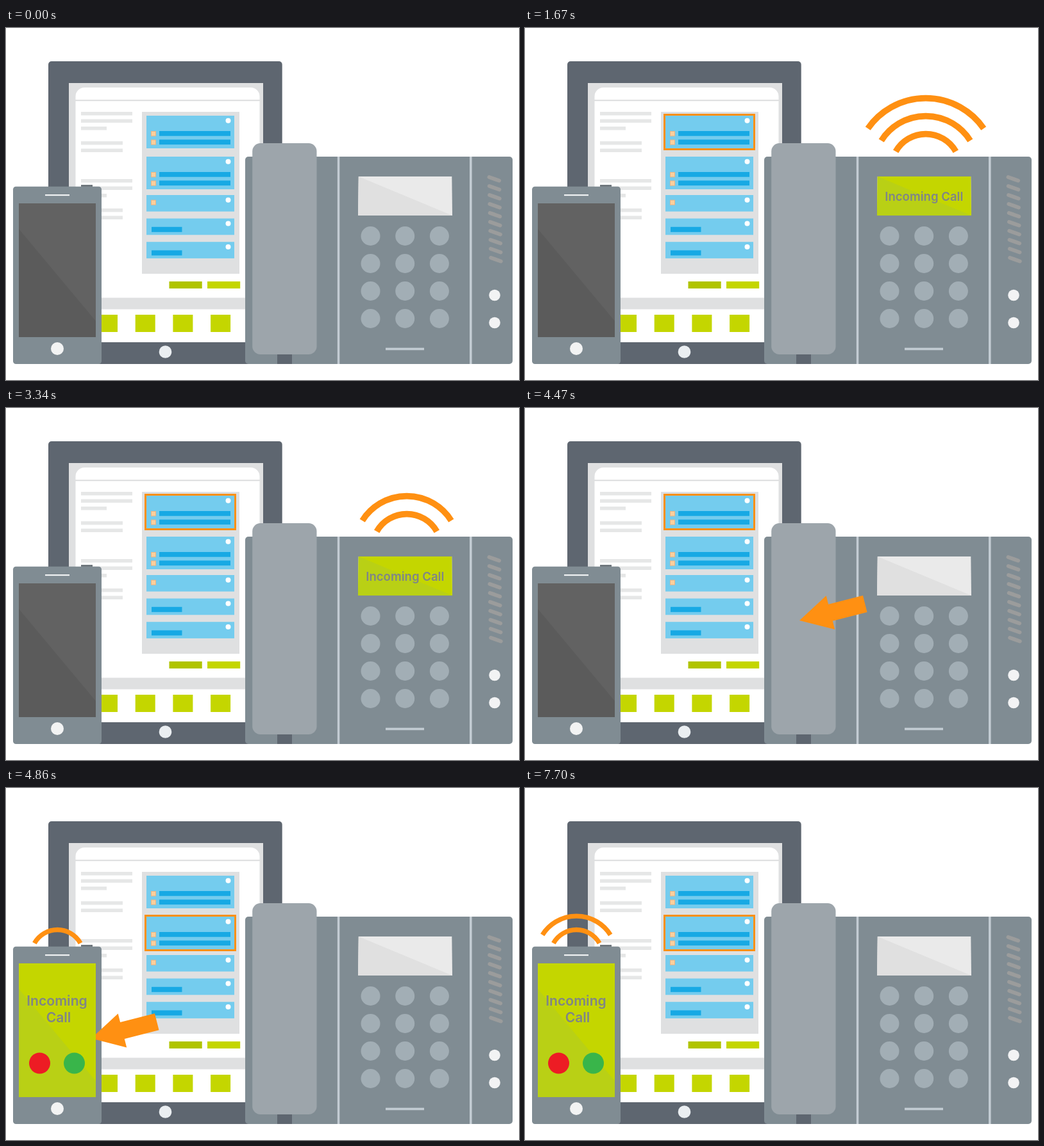
Write an HTML page that moves like this. It is 800 px wide and 550 px high and loops after 8 s.

```html
<!DOCTYPE html>
<html lang="en">
<head>
<meta charset="utf-8">
<title>Incoming call hand-over</title>
<style>
  html, body { margin: 0; width: 100%; height: 100%; overflow: hidden; background: #fff; }
  svg { display: block; width: 100%; height: 100%; }
  text { font: 600 18.6px Inter, sans-serif; fill: #7f8588; text-anchor: middle; }
  .large { font-size: 21.1px; }
  .arcs, .marker { fill: none; stroke: #ff9012; }
</style>
</head>
<body>
<svg id="stage" viewBox="0 0 800 550"></svg>
<script>
const SLATE = '#5e6670', STEEL = '#808c93', MIST = '#c3ccd3', PANEL = '#dfe0e1';
const LIME = '#c4d600', LIME_SHADE = '#b9d015', SKY = '#74ccee', BLUE = '#17a9e4';
const ORANGE = '#ff9012';

const rect = (x, y, w, h, fill, r = 0) =>
  `<rect x="${x}" y="${y}" width="${w}" height="${h}" rx="${r}" fill="${fill}"/>`;
const dot = (x, y, r, fill) => `<circle cx="${x}" cy="${y}" r="${r}" fill="${fill}"/>`;
const poly = (points, fill) => `<polygon points="${points}" fill="${fill}"/>`;
const repeat = (n, draw) => Array.from({ length: n }, (_, i) => draw(i)).join('');

// Three concentric signal arcs, each a little flatter than the one inside it.
const arcs = (id, x, y, scale) =>
  `<g id="${id}" class="arcs" stroke-width="9.6" transform="translate(${x} ${y}) scale(${scale})">` +
  repeat(3, i => {
    const r = 53.8 + 28 * i, a = (60.5 - 2.6 * i) * Math.PI / 180;
    const dx = r * Math.sin(a), dy = -r * Math.cos(a);
    return `<path d="M${-dx} ${dy}A${r} ${r} 0 0 1 ${dx} ${dy}"/>`;
  }) + '</g>';

const deskDisplay = (light, shade) =>
  poly('549.8,232 695.3,232 696,293 549,293', light) + poly('549.8,232 696,293 549,293', shade);
const phoneScreen = (light, shade) =>
  rect(20, 274, 120, 209, light) + poly('20,314 140,458 140,483 20,483', shade);

const paragraphs = top =>
  repeat(2, i => rect(117, top + 11.5 * i, 80, 5.5, '#e6e7e7')) +
  rect(117, top + 23, 40, 5.5, '#e6e7e7') +
  repeat(2, i => rect(117, top + 46 + 11.5 * i, 65, 5.5, '#e6e7e7'));

const card = (y, h) => rect(219, y, 137, h, SKY) + dot(346.5, y + 7.8, 4, '#fff');
const checkbox = y =>
  `<rect x="226.5" y="${y + .5}" width="7" height="7.3" fill="#fbcf9c" stroke="#e5b587"/>`;
const task = y => checkbox(y) + rect(239, y, 111, 7.7, BLUE);

function tallCard(i) {
  const y = 137 + 64 * i;
  return card(y, 51) + task(y + 24) + task(y + 37.4);
}

function shortCard(i) {
  const y = 261 + 36.6 * i;
  return card(y, 25.7) + (i ? rect(227, y + 13.2, 47.5, 8, BLUE) : checkbox(y + 7.5));
}

function tablet() {
  return rect(66, 52, 364.7, 473, SLATE, 5) +
    rect(98, 86, 303, 405, PANEL) +
    `<path d="M108.5 421.5V107a14 14 0 0 1 14-14H381.5a14 14 0 0 1 14 14V421.5z" fill="#fff"/>` +
    rect(108, 112, 288, 2.2, PANEL) +
    rect(98, 439.5, 303, 51.5, '#fff') +
    paragraphs(131) + paragraphs(236) +
    rect(212, 131, 152, 253, PANEL) +
    repeat(2, tallCard) + repeat(3, shortCard) +
    rect(254.5, 396, 51.2, 11, '#b0c400') + rect(314, 396, 51.2, 11, LIME) +
    repeat(4, i => rect(143 + 58.7 * i, 448, 31, 27, LIME)) +
    dot(248.5, 506, 9.8, '#eaeef1');
}

function deskPhone() {
  return rect(373, 201, 417, 324, STEEL, 5) +
    rect(423, 505, 23, 20, SLATE) +
    rect(384.2, 180, 100.3, 330, '#9da5ab', 12.5) +
    rect(516.8, 201, 3.5, 324, MIST) + rect(723, 201, 3.6, 324, MIST) +
    deskDisplay('#eaeaea', '#e0e0e0') +
    repeat(12, i => dot(568.5 + 53.7 * (i % 3), 325 + 43 * Math.floor(i / 3), 15, '#a2aeb5')) +
    rect(592, 499.7, 60, 3.6, MIST) +
    repeat(10, i => `<path d="M${753.5 + i * .3} ${233 + i * 14}l15.5 5.5"
      stroke="#9b9c9c" stroke-width="6" stroke-linecap="round"/>`) +
    repeat(2, i => dot(762, 417.5 + 43 * i, 8.8, '#f2f3f4'));
}

function mobile() {
  return rect(117, 245, 18, 6, '#6e767c') +
    rect(11, 247.7, 138, 277.3, STEEL, 4.5) +
    rect(61, 260, 38, 2.2, '#f0f2f3') +
    phoneScreen('#626262', '#5b5b5b') +
    dot(80, 501, 10, '#f2f3f3');
}

const stage = document.getElementById('stage');
stage.innerHTML = tablet() +
  '<rect id="marker" class="marker" x="217.5" y="135.5" width="140" height="54" stroke-width="3"/>' +
  deskPhone() +
  `<g id="deskCall">${deskDisplay(LIME, LIME_SHADE)}<text x="622.3" y="270">Incoming Call</text></g>` +
  arcs('deskArcs', 625, 219.4, 1) +
  arcs('phoneArcs', 80.2, 262.7, .765) +
  mobile() +
  `<g id="arrow"><path transform="rotate(-14.3)" fill="${ORANGE}"
    d="M0 0L50-27.3V-13.4H105.5V13.4H50V27.3z"/></g>` +
  `<g id="phoneCall">${phoneScreen(LIME, LIME_SHADE)}
    <text class="large" x="79.5" y="340">Incoming</text><text class="large" x="82" y="366">Call</text>
    ${dot(52.5, 430, 16.5, '#ed1c24')}${dot(106.5, 430, 16.5, '#39b54a')}</g>`;

const part = id => document.getElementById(id);
const show = (el, on) => el.setAttribute('visibility', on ? 'visible' : 'hidden');
const move = (el, x, y) => el.setAttribute('transform', `translate(${x} ${y})`);

const LOOP = 8000, CALL = 530, HANG_UP = 4440, DEPART = 4470, ARRIVE = 4860;
const STEP = 30, BEAT = 570;

// Arcs appear one per beat, then all vanish for the last beat of the cycle.
function pulse(id, ringing, elapsed, cycle) {
  const count = ringing ? (Math.floor(elapsed % cycle / BEAT) + 1) % 4 : 0;
  [...part(id).children].forEach((arc, i) => show(arc, i < count));
}

function render(t) {
  const deskRings = t >= CALL && t < HANG_UP, phoneRings = t >= ARRIVE;
  const stepped = Math.floor((t - DEPART) / STEP) * STEP;
  const p = Math.min(Math.max(stepped / (ARRIVE - DEPART), 0), 1);

  show(part('marker'), t >= CALL);
  move(part('marker'), 0, 64 * p);
  show(part('arrow'), t >= DEPART && t < ARRIVE + STEP);
  move(part('arrow'), 428 - 295 * p, 332 + 59.3 * p);
  show(part('deskCall'), deskRings);
  show(part('phoneCall'), phoneRings);
  pulse('deskArcs', deskRings, t - CALL, 4 * BEAT - 40);
  pulse('phoneArcs', phoneRings, t - ARRIVE + 10, 4 * BEAT);
}

const began = performance.now();
function tick() {
  render((performance.now() - began) % LOOP);
  requestAnimationFrame(tick);
}
tick();
</script>
</body>
</html>
```
